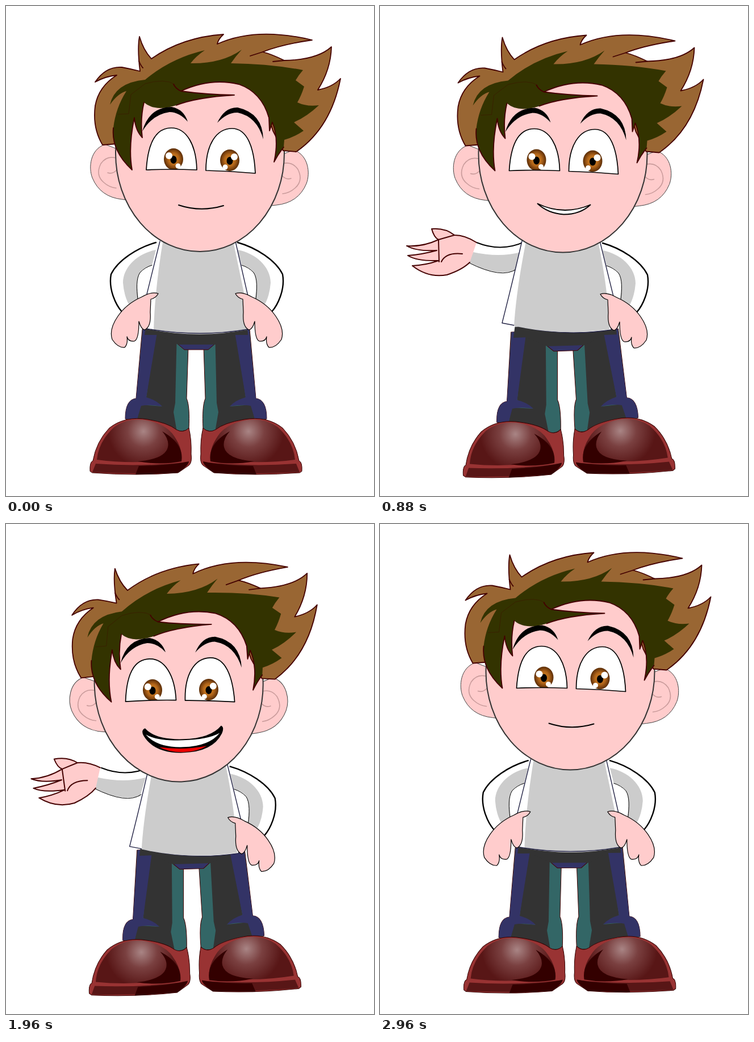
Write an HTML page that moves like this. It is 648x864 px and loops after 3 s.

```html
<!DOCTYPE html>
<html lang="en">
<head>
<meta charset="utf-8">
<title>Cartoon boy</title>
<style>
html, body { margin: 0; width: 100%; height: 100%; overflow: hidden; background: #fff; }
svg { display: block; width: 100vw; height: 100vh; }
.skin { fill: #fcc; }
.shade { fill: #ccc; }
.line { fill: none; }
</style>
</head>
<body>
<svg viewBox="0 0 648 864" stroke-linejoin="round" stroke-linecap="round">
<defs>
  <radialGradient id="shine" gradientUnits="userSpaceOnUse" cx="242" cy="750" r="62">
    <stop offset="0" stop-color="#a98585"/><stop offset=".45" stop-color="#7a4040"/><stop offset="1" stop-color="#581616"/>
  </radialGradient>
  <radialGradient id="amber">
    <stop offset="0" stop-color="#d98a20"/><stop offset=".55" stop-color="#b3661a"/><stop offset="1" stop-color="#5a2c06"/>
  </radialGradient>
  <path id="eyes" d="M247 289C250 240 265 215 291 215C318 215 335 245 336 289Q290 287 247 289ZM352 290C352 245 370 216 398 216C425 216 437 250 439 295Q395 291 352 290Z"/>
  <clipPath id="eyeClip"><use href="#eyes"/></clipPath>
  <g id="iris">
    <ellipse cx="295" cy="270" rx="17" ry="19" fill="url(#amber)"/>
    <ellipse cx="295" cy="271" rx="5.5" ry="7"/>
    <g fill="#fff"><circle cx="287" cy="264" r="6"/><circle cx="303" cy="282" r="4.5"/></g>
  </g>
  <g id="ear">
    <path class="skin" stroke="#444" d="M174 244C148 253 145 285 152 303Q166 337 205 341L214 342L215 260Z"/>
    <path class="line" stroke="#c99b9b" stroke-width="1.6" d="M197 269Q178 262 167 278Q157 298 172 311Q182 320 194 321M179 294Q188 297 195 289"/>
  </g>

  <g id="leg">
    <path fill="#366" stroke="#400" d="M240 570L229 692Q210 694 210 728L300 748Q310 752 322 746Q324 705 318 692L321 600L300 570Z"/>
    <path fill="#333" d="M264 570L247 690L275 706L237 703L231 728L301 751L295 716L298 700L301 570Z"/>
    <path fill="#336" d="M241 570H267L247 690Q265 695 275 706Q252 702 238 705L231 728H210Q210 694 229 692Z"/>
    <path fill="#933" stroke="#300" d="M148 820Q147 804 153 802Q159 768 182 744Q210 722 250 729Q285 735 300 747Q312 754 322 744Q327 765 326 790Q328 805 322 810L303 823Q230 829 152 823Z"/>
    <path fill="url(#shine)" d="M160 800Q163 768 190 743Q212 726 245 730Q278 736 293 754Q312 780 308 797Q235 810 160 800Z"/>
    <path fill="#300" d="M275 750Q314 772 309 803Q272 810 232 803Q280 799 285 778Q288 765 275 750Z"/>
    <path fill="#581616" d="M152 822L158 807Q240 813 322 804L303 823Q230 826 152 822Z"/>
    <path fill="#300" d="M228 826L234 811Q290 810 322 803Q322 810 303 823Z"/>
  </g>

  <g id="sleeve">
    <path fill="#fff" d="M408 417C440 426 475 448 487 473C492 500 478 528 468 539L440 515C442 500 443 480 436 470Q428 461 415 457Z"/>
    <path class="shade" d="M408 430C440 436 466 460 466 488Q464 515 452 532L439 515C442 490 446 464 415 457Z"/>
    <path class="line" stroke="#000" stroke-width="2.4" d="M408 417C440 426 475 448 487 473C492 500 478 528 468 539"/>
    <path class="line" stroke="#000" d="M415 457Q428 461 436 470C443 480 442 500 440 516"/>
  </g>
  <path id="fist" class="skin" stroke="#000" stroke-width="1.2" d="M404 507Q416 503 433 513Q460 525 475 547Q491 570 485 588Q475 603 463 602Q457 596 459 583Q457 592 446 591Q438 588 438 556Q434 570 428 571Q416 566 418 540L417 517Q408 515 404 507Z"/>
</defs>

<g id="legs">
  <use href="#leg"/>
  <use href="#leg" transform="translate(669) scale(-1 1)"/>
  <path fill="#336" stroke="#400" d="M300 594L314 606H356L370 594Z"/>
  <path fill="#333" d="M247 561H424L426 580H402L370 597H303L266 580H244Z"/>
</g>

<g id="hips">
  <g class="hipArm"><use href="#sleeve"/><use href="#sleeve" transform="translate(672) scale(-1 1)"/></g>
  <g id="shirt">
    <path fill="#fff" d="M271 410L247 512V569Q340 588 426 570L428 520L403 410Z"/>
    <path class="shade" d="M277 410Q262 500 260 571Q345 584 425 571L421 515L399 410Z"/>
    <path class="line" stroke="#224" stroke-width="1.4" d="M271 415L247 512M404 415L428 520M247 569L260 571Q345 584 426 570"/>
  </g>
  <g class="hipArm"><use href="#fist"/><use href="#fist" transform="translate(672) scale(-1 1)"/></g>
</g>

<g id="reach">
  <g id="reachSleeve">
    <path fill="#fff" d="M170 417Q215 435 256 415L240 465Q234 470 220 470Q190 470 157 453Z"/>
    <path class="shade" d="M164 434Q210 444 248 434L238 467Q200 476 157 452Z"/>
    <path class="line" stroke="#000" stroke-width="2" d="M170 417Q215 435 256 415"/>
    <path class="line" stroke="#000" d="M157 453Q215 482 240 464"/>
  </g>
  <g id="chest">
    <use href="#sleeve" transform="translate(-16 1)"/>
    <path fill="#fff" stroke="#224" stroke-width="1.4" d="M251 410Q235 480 215 559L236 563Q320 584 407 571L411 512L386 410Z"/>
    <path class="shade" d="M258 410Q240 500 236 564Q320 583 404 570Q402 500 383 410Z"/>
    <use href="#fist" transform="translate(-16 1)"/>
  </g>
  <g id="palm" stroke="#400" stroke-width="2">
    <path class="skin" d="M170 417Q150 404 131 404Q115 391 91 393Q95 408 103 412Q75 425 47 423Q65 433 100 431Q75 438 49 440Q65 450 103 449Q80 457 57 458Q85 480 118 474Q145 465 158 452"/>
    <path class="line" d="M131 404L103 412L104 451M108 451Q116 434 145 437"/>
  </g>
</g>

<g id="head">
  <use href="#ear"/>
  <use href="#ear" transform="translate(681 10) scale(-1 1)"/>
  <ellipse class="skin" stroke="#333" stroke-width="2" cx="341.5" cy="260" rx="148.5" ry="173"/>
  <g stroke="#400" stroke-width="1.8">
    <path fill="#963" d="M170 245Q152 215 157 176Q163 142 195 122Q175 124 157 134Q176 106 204 108Q220 111 236 115Q231 75 235 54Q242 78 256 93Q310 55 383 50Q374 58 372 67Q440 36 539 60Q485 68 452 81Q468 85 490 96Q548 95 573 72Q572 112 549 148Q575 143 589 128Q572 215 511 257L488 255L470 220L450 152Q380 115 300 140L240 150L195 243Z"/>
    <path class="line" d="M452 81L430 88M470 98L490 96M234 97Q238 106 241 109"/>
    <path fill="#330" stroke="none" d="M222 289Q185 255 189 215Q193 180 212 150Q197 154 183 174Q192 135 245 130Q290 92 350 78Q335 88 325 101Q380 102 415 77Q405 88 396 101Q465 102 523 113Q515 122 510 131L525 142Q520 158 513 170Q530 178 551 175Q530 195 507 205L524 220Q508 231 490 236L489 249Q480 260 472 275Q481 235 469 205L464 220L463 197Q450 152 410 138Q360 126 308 150Q350 156 402 157Q335 161 300 175Q262 187 243 170Q236 200 240 232Q228 220 226 197Q215 250 222 289Z"/>
    <path class="line" d="M189 215Q185 255 222 289Q215 250 226 197Q228 220 240 232Q236 200 243 170M295 138Q299 146 308 150Q360 126 410 138Q450 152 463 197L464 220L469 205Q481 235 472 275Q480 260 489 249M308 150Q350 156 402 157Q335 161 300 175"/>
    <path class="line" stroke-width=".6" opacity=".6" d="M297 138Q280 127 245 137L220 156L216 190L197 191"/>
  </g>
  <g id="face">
    <path d="M240 221Q252 178 292 178Q313 182 320 204Q305 187 288 187Q258 191 240 221ZM372 206Q385 178 408 179Q452 189 453 235Q442 195 408 188Q390 187 372 206Z"/>
    <use href="#eyes" fill="#fff"/>
    <g clip-path="url(#eyeClip)">
      <use href="#iris"/>
      <use href="#iris" transform="translate(689 2) scale(-1 1)"/>
      <rect id="lid" x="235" y="200" width="215" fill="#f99" stroke="#000" stroke-width="1.6"/>
    </g>
    <use href="#eyes" fill="none" stroke="#000" stroke-width="1.7"/>
    <path id="calm" class="line" stroke="#000" stroke-width="2" d="M304 351Q343 364 383 352"/>
    <path id="smile" fill="#fff" stroke="#000" stroke-width="1.9" d="M297 347Q343 369 390 349Q372 366 343 366Q315 364 297 347Z"/>
    <g id="grin">
      <path d="M280 337Q272 340 277 350Q295 382 346 382Q398 382 415 350Q420 339 414 336Q395 358 346 358Q297 358 280 337Z"/>
      <path fill="#fff" d="M281 348Q300 360 346 360Q390 360 411 349Q392 372 346 372Q300 372 281 348Z"/>
      <path fill="#e00" d="M304 371Q346 378 388 371Q370 381 346 381Q322 381 304 371Z"/>
    </g>
  </g>
</g>
</svg>
<script>
const LOOP = 3000, STEP = 40;
const $ = id => document.getElementById(id);

// Head poses: shift right, shift down, turn in degrees.
const REST = [0, 0, 0], TILT = [-20.5, -1, -4.8], TURN = [-19.5, 1.5, 0];
const DIP = [-19, 20.5, 1.1], LEAN = [-45, 22, -3];
const keys = [[0, REST], [360, TILT], [600, TURN], [880, TURN], [1320, DIP],
  [2280, LEAN], [2720, LEAN], [2880, TURN], [LOOP, REST]];

const ramp = (t, from, to) => Math.min(1, Math.max(0, (t - from) / (to - from)));

function headPose(t) {
  const i = keys.findIndex(([end]) => end > t);
  const [from, a] = keys[i - 1], [to, b] = keys[i];
  return a.map((v, j) => v + (b[j] - v) * ramp(t, from, to));
}

const move = (el, x, y, turn = 0, cx = 0, cy = 0) =>
  el.setAttribute('transform', `translate(${x} ${y}) rotate(${turn} ${cx} ${cy})`);
const toggle = (id, on) => $(id).setAttribute('display', on ? 'inline' : 'none');

function draw(t) {
  const [x, y, turn] = headPose(t);
  const lean = ramp(t, 520, 680) - ramp(t, 2800, LOOP);
  const lid = ramp(t, 160, 320) - ramp(t, 400, 560);
  const grin = .6 + .4 * (ramp(t, 1680, 1960) - ramp(t, 2200, 2480));
  const reaching = t >= 680 && t < 2840;
  const grinning = t >= 1680 && t < 2480;
  const smiling = t >= 200 && t < 1160;

  move($('head'), x, y, turn, 341, 295);
  move($('face'), -2 * lid, 9 * lid);
  $('lid').setAttribute('height', 10 + 62 * lid);

  // The body follows the head with less travel.
  const sink = y - TURN[1], sway = TURN[0] - x;
  move($('chest'), .16 * sway, .48 * sink);
  move($('reachSleeve'), -2 * ramp(t, 880, 1320), .65 * sink);
  move($('palm'), -2 * ramp(t, 880, 1320), .65 * sink, -16 * ramp(t, 1200, 2600) ** 1.5, 165, 435);

  move($('legs'), -4 * lean, 2 * lean, -1.8 * lean, 335, 740);
  move($('shirt'), -28 * lean, lean);
  document.querySelectorAll('.hipArm').forEach(el => move(el, -16 * lean, lean));

  $('grin').setAttribute('transform', `translate(346 354) scale(${grin}) translate(-346 -354)`);
  toggle('reach', reaching);
  toggle('hips', !reaching);
  toggle('grin', grinning);
  toggle('smile', smiling);
  toggle('calm', !grinning && !smiling);
}

const start = performance.now();
function tick() {
  const t = (performance.now() - start) % LOOP;
  draw(Math.floor(t / STEP) * STEP);
  requestAnimationFrame(tick);
}
tick();
</script>
</body>
</html>
```
